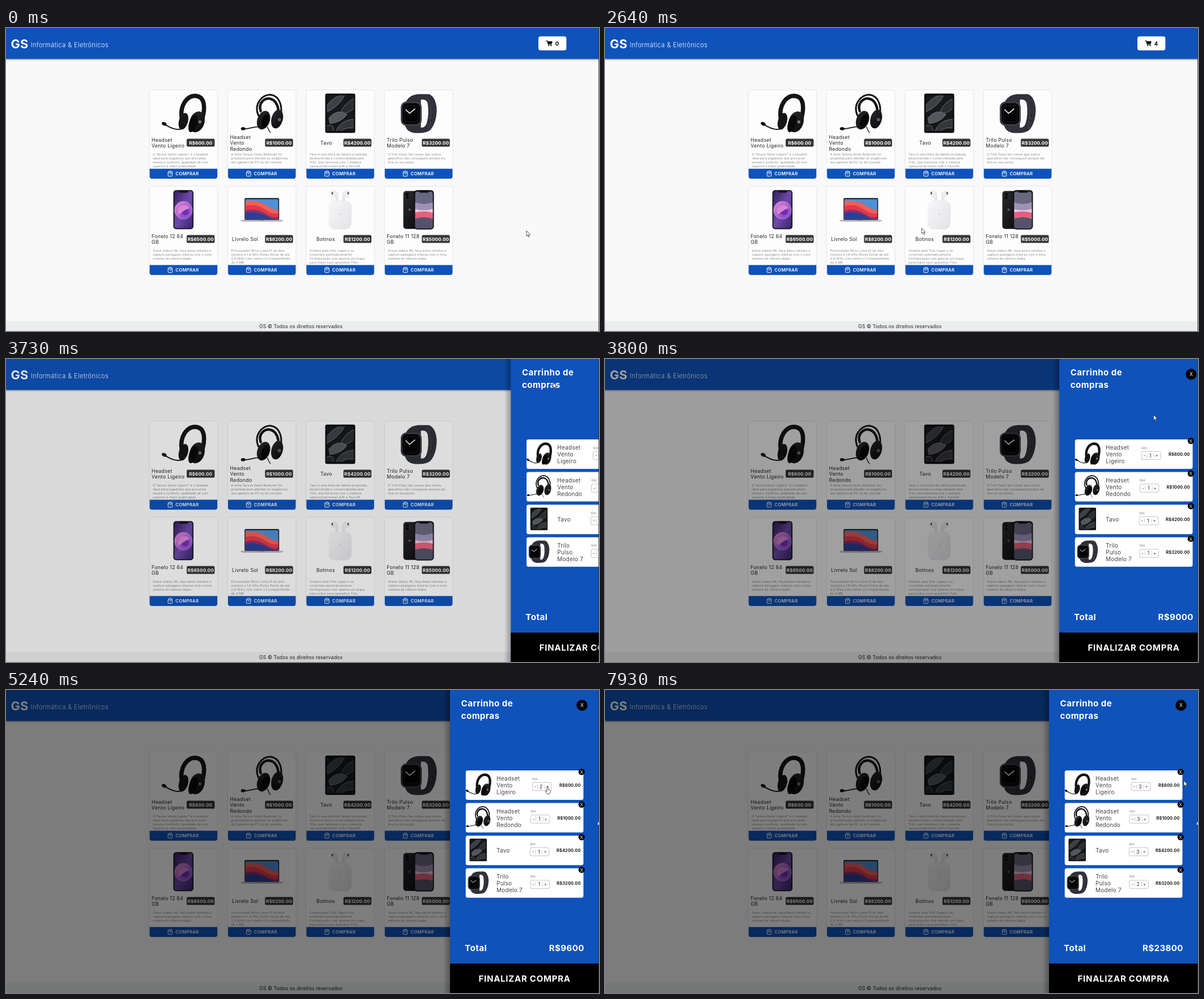
These frames come from a looping animation (1047 px wide and 535 px high, 8 s). An HTML page:

```html
<!DOCTYPE html>
<html lang="pt-BR">
<head>
<meta charset="utf-8">
<title>Loja</title>
<style>
  html, body { margin: 0; width: 100%; height: 100%; overflow: hidden; background: #f9f9f9; }
  svg { display: block; width: 100vw; height: 100vh; }
  text { font-family: Montserrat, Inter, "Open Sans", sans-serif; letter-spacing: .025em; }
  .card { filter: drop-shadow(0 .6px .9px rgba(0,0,0,.18)); }
  .bar { filter: drop-shadow(0 1.2px 1.8px rgba(0,0,0,.45)); }
</style>
</head>
<body>
<svg id="stage" viewBox="0 0 1047 535">
  <defs>
    <linearGradient id="dark" x1="0" y1="0" x2="1" y2="1">
      <stop offset="0" stop-color="#2a2a2d"/><stop offset="1" stop-color="#09090b"/>
    </linearGradient>
    <linearGradient id="violet" x1="0" y1="0" x2="1" y2="1">
      <stop offset="0" stop-color="#33205f"/><stop offset=".5" stop-color="#6d4bab"/><stop offset="1" stop-color="#3a2470"/>
    </linearGradient>
    <linearGradient id="pink" x1="0" y1="0" x2="1" y2="1">
      <stop offset="0" stop-color="#e58ad0"/><stop offset="1" stop-color="#7a3fc8"/>
    </linearGradient>
    <linearGradient id="pearl" x1="0" y1="0" x2="1" y2="1">
      <stop offset="0" stop-color="#f7f7f8"/><stop offset="1" stop-color="#e2e3e6"/>
    </linearGradient>
    <linearGradient id="cast">
      <stop offset="0" stop-opacity="0"/><stop offset="1" stop-opacity=".3"/>
    </linearGradient>
    <clipPath id="screen"><rect x="-29" y="-18.5" width="58" height="35.5"/></clipPath>
    <clipPath id="slate"><rect x="-23.5" y="-31.5" width="47" height="62.5" rx="1"/></clipPath>
    <clipPath id="glass"><rect x="-6" y="-32" width="31" height="65" rx="4"/></clipPath>
    <g id="p0">
      <g fill="none" stroke="#141416" stroke-linecap="round">
        <path d="M-3 10C-7-14 6-31 21-31C39-30 39-8 32 14" stroke-width="7.5"/>
        <path d="M-2 27C-14 31-23 25-34 19" stroke-width="2"/>
      </g>
      <ellipse cx="0" cy="14" rx="8" ry="15" transform="rotate(16 0 14)" fill="#151517"/>
      <ellipse cx="24" cy="15" rx="13" ry="19" transform="rotate(18 24 15)" fill="url(#dark)"/>
      <ellipse cx="17" cy="18" rx="7" ry="16" transform="rotate(18 17 18)" fill="#09090a"/>
      <circle cx="29" cy="15" r="2.8" fill="#77777c"/>
      <ellipse cx="-34" cy="18.5" rx="4.5" ry="3" transform="rotate(25 -34 18.5)" fill="#111"/>
    </g>
    <g id="p1">
      <g fill="none" stroke="#151517" stroke-linecap="round">
        <path d="M-6 4C-15-17 1-33 15-33C32-31 37-12 33 6" stroke-width="3"/>
        <path d="M-2-4C-7-19 5-27 14-26C26-24 30-10 29 0" stroke-width="4.5"/>
        <path d="M-3 24C-15 22-21 29-33 27" stroke-width="1.8"/>
        <path d="M10 24Q12 30 15 34" stroke-width="1.3"/>
      </g>
      <ellipse cx="3" cy="12" rx="11" ry="17" transform="rotate(20 3 12)" fill="url(#dark)"/>
      <ellipse cx="6" cy="13" rx="6" ry="12" transform="rotate(20 6 13)" fill="#070708"/>
      <ellipse cx="27" cy="10" rx="10" ry="17" transform="rotate(15 27 10)" fill="url(#dark)"/>
      <circle cx="31" cy="11" r="3" fill="#5c5c60"/>
      <ellipse cx="-33" cy="27" rx="4" ry="2.8" fill="#111"/>
    </g>
    <g id="p2">
      <rect x="-26.5" y="-35" width="53" height="69.5" rx="3.2" fill="#0e0f11"/>
      <g clip-path="url(#slate)">
        <rect x="-24" y="-32" width="48" height="64" fill="#17181b"/>
        <g stroke="#7b7f84" stroke-width=".8">
          <path d="M-24-14Q-8-34 8-32Q-2-12-24-2Z" fill="#3d4045"/>
          <path d="M24-26Q4-16 0 2Q20-2 24-10Z" fill="#2b2d31"/>
          <path d="M-20 8Q-4-10 12 2Q2 16-18 18Z" fill="#54575c"/>
          <path d="M-8 32Q0 12 24 10V26Q8 24 2 32Z" fill="#34363a"/>
          <path d="M-24 22Q-10 18-12 32H-24Z" fill="#222428"/>
        </g>
      </g>
    </g>
    <g id="p3">
      <path d="M-24-17Q-18-33 0-34H18Q30-30 32-8Q32 16 21 29Q14 36-8 34.5Q-22 32-24 20Z" fill="#30313a"/>
      <path d="M4-24Q13-26 16-18Q19 2 14 18Q11 26 4 25Z" fill="#fafafa"/>
      <path d="M14-32Q27-10 19 27" fill="none" stroke="#45464f" stroke-width="1"/>
      <circle cx="24" cy="4" r="1.3" fill="#16171b"/><circle cx="22.5" cy="12" r="1.3" fill="#16171b"/>
      <rect x="-31.5" y="-21" width="37" height="43" rx="10" fill="#3c3d45"/>
      <rect x="-28.5" y="-18" width="31" height="37" rx="7.5" fill="#050506"/>
      <rect x="-25" y="-14" width="24" height="29" rx="5" fill="none" stroke="#555" stroke-width="1.4" stroke-dasharray=".6 2"/>
      <path d="M-23-7L-16 0L-6-8" fill="none" stroke="#fff" stroke-width="1.6"/>
    </g>
    <g id="p4">
      <rect x="-17.8" y="-34.5" width="35.5" height="69" rx="5" fill="#16131d"/>
      <rect x="-16" y="-32.7" width="32" height="65.4" rx="3.6" fill="url(#violet)"/>
      <circle cy="1" r="15.6" fill="url(#pink)" stroke="#c9a4ea" stroke-width=".7"/>
      <circle cx="2" cy="2.5" r="11" fill="#9a50cc"/>
      <circle cx="3" cy="3.5" r="6.5" fill="#6a32b2"/>
      <path d="M-8 9A11 11 0 0 1 11-3Q2 0-8 9" fill="#d884d6"/>
      <rect x="-8" y="-34" width="16" height="4" rx="2" fill="#16131d"/>
    </g>
    <g id="p5">
      <rect x="-30.5" y="-20.5" width="61" height="39" rx="2" fill="#18181b"/>
      <g clip-path="url(#screen)">
        <rect x="-30" y="-20" width="60" height="40" fill="#4f8fd6"/>
        <path d="M-30-15Q-8-19 8-8T30-1V20H-30Z" fill="#f0605a"/>
        <path d="M-30-6Q-12-12 4-1T30 6V20H-30Z" fill="#e23a46"/>
        <path d="M-30 2Q-12-4 6 7T30 11V20H-30Z" fill="#8c2f74"/>
        <path d="M-30 6Q-10 2 10 12T30 15V20H-30Z" fill="#2b3f96"/>
      </g>
      <path d="M-37.5 18H37.5V19.5Q36 21.2 32 21.2H-32Q-36 21.2-37.5 19.5Z" fill="#b8b9bd"/>
      <path d="M-5 18H5L4 19.2H-4Z" fill="#898a8e"/>
    </g>
    <g id="p6">
      <g fill="url(#pearl)" stroke="#dcdde0" stroke-width=".4">
        <path id="bud" d="M-17-30Q-15-35-8-33Q-3-30-4-25V-12H-8V-22Q-16-21-17-30Z"/>
        <use href="#bud" transform="scale(-1 1)"/>
        <rect x="-19.8" y="-16" width="39.5" height="50.5" rx="11"/>
        <path d="M-19.5 0H19.5"/>
      </g>
      <ellipse cx="-14" cy="-29" rx="1.4" ry="2.4" fill="#555"/><ellipse cx="14" cy="-29" rx="1.4" ry="2.4" fill="#555"/>
      <circle cy="8" r="1" fill="#b4b5b8"/>
    </g>
    <g id="p7">
      <rect x="-27" y="-33" width="34" height="67" rx="5" fill="url(#dark)"/>
      <rect x="-25" y="-31" width="13" height="14" rx="4" fill="#242428"/>
      <circle cx="-20" cy="-27" r="2.4" fill="#08080a"/><circle cx="-20" cy="-21" r="2.4" fill="#08080a"/>
      <circle cx="-16" cy="0" r="2.2" fill="#55555a"/>
      <rect x="-8" y="-34.5" width="35" height="69.5" rx="5.5" fill="#101013"/>
      <g clip-path="url(#glass)">
        <rect x="-9" y="-33" width="35" height="67" fill="#6a6780"/>
        <path d="M-9-14Q10-6 26-14V-2Q10 4-9-2Z" fill="#9d92b8"/>
        <path d="M-9-2Q10 4 26-2V6Q10 1-9 6Z" fill="#f2c6d8"/>
        <path d="M-9 6Q10 1 26 6V17Q10 10-9 17Z" fill="#e5607e"/>
        <path d="M-9 17Q10 10 26 17V34H-9Z" fill="#55536a"/>
      </g>
      <rect x="1" y="-34" width="17" height="4" rx="2" fill="#101013"/>
    </g>
    <g id="bag" fill="none" stroke="#fff" stroke-width="1">
      <path d="M.5 2.6L2 .5H6.6L8 2.6V8.4Q8 9.3 7 9.3H1.5Q.5 9.3 .5 8.4ZM.5 2.7H8M2.6 4.4Q4.3 7 6 4.4"/>
    </g>
  </defs>
</svg>
<script>
const LOOP = 8000, BLUE = '#0f52ba', PANEL_X = 784, PANEL_W = 263;
const stage = document.getElementById('stage');

const text = (x, y, str, size, { w = 400, fill = '#222', anchor = 'start', gap, id } = {}) =>
  `<text x="${x}" y="${y}" font-size="${size}" font-weight="${w}" fill="${fill}" text-anchor="${anchor}"` +
  `${gap === undefined ? '' : ` style="letter-spacing:${gap}em"`}${id ? ` id="${id}"` : ''}>${str}</text>`;
const rect = (x, y, w, h, fill, extra = '') =>
  `<rect x="${x}" y="${y}" width="${w}" height="${h}" fill="${fill}" ${extra}/>`;
const circle = (x, y, r) => `<circle cx="${x}" cy="${y}" r="${r}" fill="#000"/>`;
const lines = (x, midBase, list, step, size, opts) =>
  list.map((s, i) => text(x, midBase + (i - (list.length - 1) / 2) * step, s, size, opts)).join('');

const cameraText = 'Grave vídeos 4K, faça belos retratos e|capture paisagens inteiras com o novo|sistema de câmera dupla.';
// title lines, title offset, price, description
const products = [
  ['Headset|Vento Ligeiro', 3.5, 600, 'O Taruva Vento Ligeiro™ é o headset|ideal para jogadores que procuram|leveza e conforto, qualidade de som|superior e maior praticidade.'],
  ['Headset|Vento|Redondo', 3.5, 1000, 'A linha Taruva Vento Redondo foi|projetada para atender as exigências|dos gamers de PC ou de console.'],
  ['Tavo', 24.5, 4200, 'Tavo é uma linha de tablets projetada,|desenvolvida e comercializada pela|Trilo, que funciona com o sistema|operacional móvel zUR e TavoUR.'],
  ['Trilo Pulso|Modelo 7', 3.5, 3200, 'O Trilo Pulso faz coisas que outros|aparelhos não conseguem porque ele|fica no seu pulso.'],
  ['Fonelo 12 64|GB', 3.5, 6500, cameraText],
  ['Livrelo Sol', 7, 8200, 'Processador Brivo Lume t5 de dois|núcleos e 1,8 GHz (Pulso Extra) de até|2,9 GHz) com cache L3 compartilhado|de 3 MB.'],
  ['Botinos', 17.5, 1200, 'Criados pela Trilo Ligam e se|conectam automaticamente|Configuração com apenas um toque|para todos seus aparelhos Trilo.'],
  ['Fonelo 11 128|GB', 3.5, 5000, cameraText],
];

function card([title, dx, price, about], i) {
  const x = 253.6 + (i % 4) * 138.4, y = 110 + Math.floor(i / 4) * 170;
  return `<g transform="translate(${x} ${y})">` +
    rect(0, 0, 119.5, 156, '#fdfdfd', 'rx="4" class="card"') +
    `<use href="#p${i}" x="59.7" y="40.7"/>` +
    lines(dx, 96.1, title.split('|'), 10.5, 8.73, { gap: .035 }) +
    rect(65.4, 85.6, 49.4, 14, '#363636', 'rx="2.6"') +
    text(90.1, 95.8, `R$${price}.00`, 8.2, { w: 700, fill: '#fff', anchor: 'middle', gap: .01 }) +
    about.split('|').map((s, n) => text(5.6, 114.8 + n * 7.2, s, 5.45, { fill: '#858585' })).join('') +
    `<path d="M0 138.5H119.5V152Q119.5 156 115.5 156H4Q0 156 0 152Z" fill="${BLUE}"/>` +
    '<use href="#bag" x="32" y="142.3"/>' +
    text(45.7, 150, 'COMPRAR', 7.6, { w: 600, fill: '#fff', gap: .045 }) + '</g>';
}

function cartItem([title, , price], i) {
  const y = 142 + i * 57.6, boxX = [145, 142, 141, 141.5][i];
  const names = title.replace('Vento L', 'Vento|L').replace('o P', 'o|P').split('|');
  const light = { fill: '#999', anchor: 'middle', gap: 0 }, mark = { w: 600, fill: '#444', anchor: 'middle', gap: 0 };
  return `<g transform="translate(0 ${y})">` +
    rect(27.7, 0, 207.8, 52, '#fff', 'rx="3.5"') +
    `<use href="#p${i}" transform="translate(49.7 25.3) scale(.575)"/>` +
    lines(82, 30, names, 12, 10, { fill: '#444' }) +
    text(boxX, 16.6, 'Qtd:', 5.2, { fill: '#777' }) +
    rect(boxX + .3, 21.2, 33.6, 14.4, '#fff', 'rx="2" stroke="#aaa" stroke-width=".7"') +
    text(boxX + 5.5, 31, '-', 7.5, mark) + text(boxX + 9.7, 30.6, '|', 6.5, light) +
    text(boxX + 15.8, 31.6, '1', 9, { fill: '#2d3350', anchor: 'middle', gap: 0, id: 'qty' + i }) +
    text(boxX + 22, 30.6, '|', 6.5, light) + text(boxX + 27, 31, '+', 7, mark) +
    text(230.6, 29, `R$${price}.00`, 7.5, { w: 700, anchor: 'end', gap: .01 }) +
    circle(232.3, 2.6, 5.6) + text(232.3, 5.7, 'X', 8, { fill: '#fff', anchor: 'middle', gap: 0 }) + '</g>';
}

const white = { w: 700, fill: '#fff', gap: .03 };
stage.insertAdjacentHTML('beforeend',
  rect(0, 0, 1047, 535, '#f9f9f9') +
  rect(0, 0, 1047, 54.6, BLUE, 'class="bar"') +
  text(8.4, 35.5, 'GS', 21.8, { w: 700, fill: '#fff', gap: .01 }) +
  text(43.8, 34, 'Informática &amp; Eletrônicos', 11, { w: 300, fill: '#fff', gap: .038 }) +
  rect(940, 14.8, 49.4, 24.7, '#fff', 'rx="4"') +
  `<g transform="translate(953.5 22)"><path d="M0 .6H2L4 7.3H10" fill="none" stroke="#000" stroke-width="1.1"/>
   <path d="M2.2 1.6H11.5L10 6.2H3.6Z"/><circle cx="4.8" cy="9" r="1.1"/><circle cx="9" cy="9" r="1.1"/></g>` +
  text(973, 30.6, '0', 9.6, { w: 700, fill: '#000', anchor: 'middle', gap: 0, id: 'count' }) +
  products.map(card).join('') +
  rect(0, 517.4, 1047, 17.6, '#eceeee') +
  text(520.6, 529.6, 'GS © Todos os direitos reservados', 8.73, { anchor: 'middle', gap: .01 }) +
  rect(0, 0, 1047, 535, '#000', 'id="shade"') +
  '<g id="panel">' + rect(-12, 0, 12, 535, 'url(#cast)') + rect(0, 0, 264, 535, BLUE) +
  text(19.6, 29.3, 'Carrinho de', 15.1, white) + text(19.6, 51.3, 'compras', 15.1, white) +
  circle(233, 27, 9.7) + text(233, 30.2, 'X', 8.7, { fill: '#fff', anchor: 'middle', gap: 0 }) +
  products.slice(0, 4).map(cartItem).join('') +
  text(26, 460.6, 'Total', 15.2, white) +
  text(236.8, 460.6, '', 15.2, { ...white, anchor: 'end', gap: .02, id: 'total' }) +
  rect(0, 483, 264, 52, '#000') +
  text(131.6, 514.8, 'FINALIZAR COMPRA', 15, { ...white, anchor: 'middle', gap: .05 }) + '</g>' +
  rect(1046.2, 0, .8, 535, '#333') +
  rect(1045, 233.5, 1.6, 4.5, '#fff', 'id="edge"') +
  `<g id="cursor" fill="#fff" stroke="#222" stroke-width=".75" stroke-linejoin="round">
   <path id="arrow" d="M0 0V9.4L2.2 7.6L3.7 11L5.2 10.4L3.7 7.1H6.5Z"/>
   <path id="hand" d="M-1.1 1A1.1 1.1 0 0 1 1.1 1V4.6L4.2 5.4Q5.4 5.8 5.2 7.4L4.5 11.2Q4.2 12.8 3 12.8H-.2L-3.4 8.2Q-3.8 6.9-2.6 7L-1.1 8.3Z"/></g>`);

const el = Object.fromEntries([...stage.querySelectorAll('[id]')].map(n => [n.id, n]));

// time, x, y of the pointer tip
const path = [
  [240, 919, 358], [930, 753, 255], [1060, 753, 255], [1260, 599, 258], [1530, 599, 258],
  [1740, 489, 272], [1940, 466, 259], [2010, 466, 259], [2270, 313, 257], [2420, 313, 257],
  [2700, 640, 385], [2900, 930, 397], [3120, 1033, 300], [3400, 985, 60], [3600, 966, 27],
  [3670, 966, 27], [3731, 966, 41], [3869, 971, 155], [3940, 970, 182], [4200, 985, 316],
  [4500, 952, 230], [4750, 955, 180], [4880, 956, 171], [5400, 956, 171], [5590, 956, 228],
  [6150, 956, 228], [6400, 956, 285], [7000, 956, 285], [7200, 956, 343], [7420, 956, 343],
  [7700, 1034, 230], [7920, 1022, 160],
];
const adds = [1060, 1530, 1990, 2360];
const plusClicks = [[5000, 0], [5330, 0], [5800, 1], [6060, 1], [6560, 2], [6820, 2], [7320, 3]];
const OPEN = 3697;

function tick(t) {
  if (t < 240) return 0;
  const [base, step, slack] = t < 1530 ? [240, 69, .15] : [1530, 68.8, .1];
  return base + step * Math.floor((t - base) / step + slack);
}

function pointer(t) {
  const i = path.findIndex(p => p[0] > t);
  if (i === 0) return path[0].slice(1);
  if (i < 0) return path[path.length - 1].slice(1);
  const a = path[i - 1], b = path[i], k = (t - a[0]) / (b[0] - a[0]);
  return [a[1] + (b[1] - a[1]) * k, a[2] + (b[2] - a[2]) * k];
}

function draw(t) {
  const age = Math.max(0, t - OPEN);
  const slide = age > 220 ? 1 : 1 - Math.exp(-age / 38.6);
  el.panel.setAttribute('transform', `translate(${PANEL_X + PANEL_W * (1 - slide)} 0)`);
  el.panel.style.display = age ? '' : 'none';
  el.shade.setAttribute('opacity', .5 * Math.min(1, age / 140));
  el.edge.style.display = t > 4100 ? '' : 'none';

  el.count.textContent = adds.filter(at => t >= at).length;
  let total = 0;
  for (let i = 0; i < 4; i++) {
    const qty = 1 + plusClicks.filter(([at, row]) => row === i && t >= at).length;
    el['qty' + i].textContent = qty;
    total += qty * products[i][2];
  }
  el.total.textContent = 'R$' + total;

  const [x, y] = pointer(t);
  const onPlus = Math.abs(x - 956) < 5 && [170, 228, 285, 343].some(r => Math.abs(y - r) < 7);
  const hover = age ? onPlus : y > 248 && y < 266 && x < 788;
  el.cursor.setAttribute('transform', `translate(${x} ${y})`);
  el.arrow.style.display = hover ? 'none' : '';
  el.hand.style.display = hover ? '' : 'none';
}

const start = performance.now();
function loop() {
  draw(tick((performance.now() - start) % LOOP));
  requestAnimationFrame(loop);
}
loop();
</script>
</body>
</html>
```
